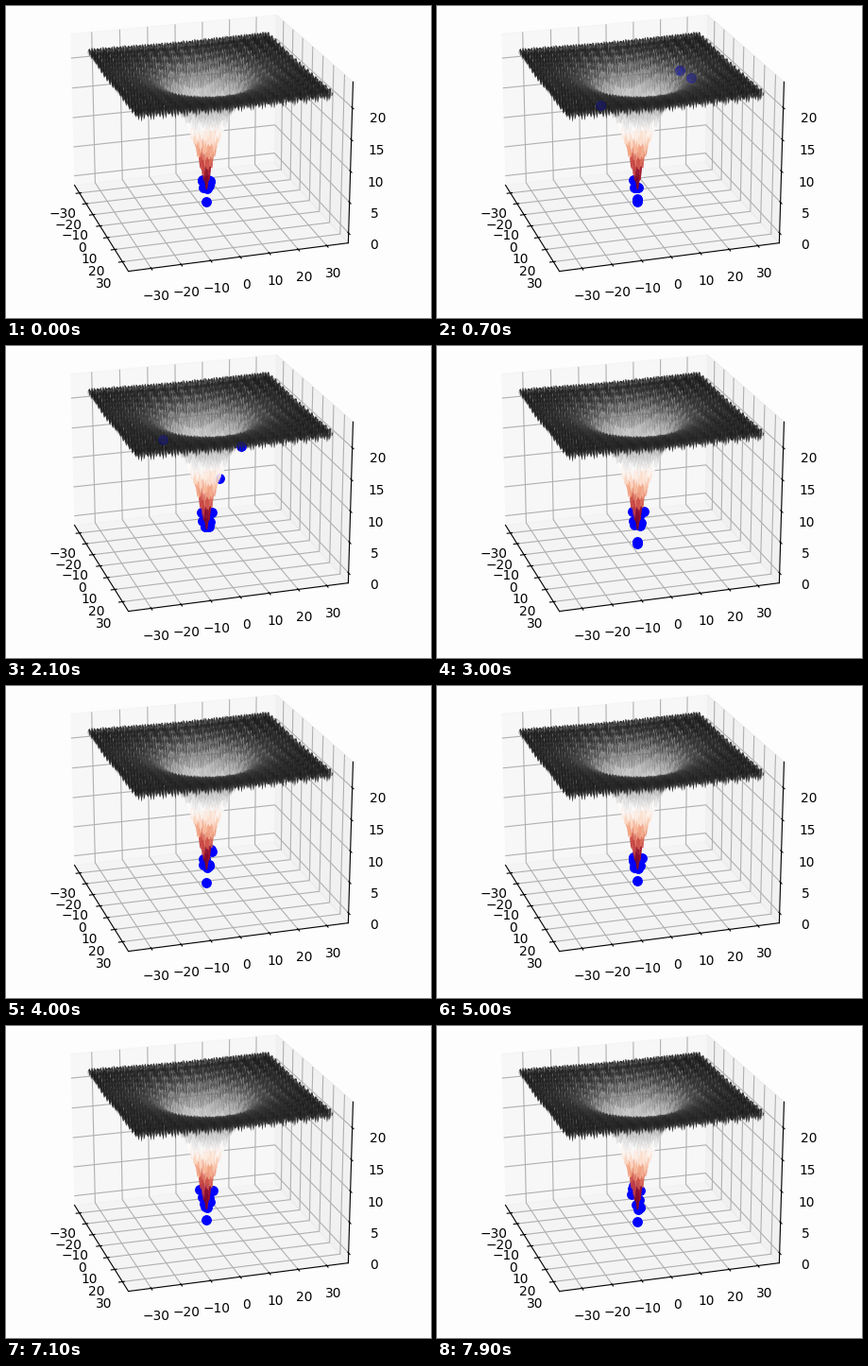
These frames come from a looping animation (450x330 px, 8000 ms). A matplotlib script:

```python
import numpy as np
import matplotlib.pyplot as plt
from matplotlib.animation import FuncAnimation
from matplotlib.collections import PolyCollection
from mpl_toolkits.mplot3d import proj3d

W, H, DPI = 450, 330, 100
FRAMES, STEP_MS = 80, 100
BACKGROUND = "#fefdfe"

EXTENT, TOP = 32.768, 22.35     # function domain and its highest value
PAD = 0.55 * 25 / 24            # half range including the axis margins
SIDE = 366                      # side of the square 3D axes in pixels
CENTER = np.array([212.2, 137.8])
VIEW_LOW, VIEW_SPAN = 0.095, 0.185

MEMBERS, SETTLED = 11, 32       # swarm size and the step when it has gathered
PAUSES = {22, 47, 62}


def ackley(x, y):
    bowl = 20 * (1 - np.exp(-0.2 * np.sqrt((x**2 + y**2) / 2)))
    waves = np.exp((np.cos(2 * np.pi * x) + np.cos(2 * np.pi * y)) / 2)
    return bowl + np.e - waves


plt.rcParams["font.family"] = "DejaVu Sans"
fig = plt.figure(figsize=(W / DPI, H / DPI), dpi=DPI, facecolor=BACKGROUND)

# Empty 3D box with its panes, grid and ticks
offset = SIDE * VIEW_LOW / VIEW_SPAN
left, bottom = CENTER[0] - offset, H - CENTER[1] - offset
box = fig.add_axes([left / W, bottom / H, SIDE / W, SIDE / H], projection="3d")
box.patch.set_visible(False)
box.view_init(elev=21, azim=-17)
reach = 2 * EXTENT * PAD
box.set_xlim(-reach, reach)
box.set_ylim(-reach, reach)
box.set_zlim(TOP * (0.5 - PAD), TOP * (0.5 + PAD))
box.set_xticks(range(-30, 31, 10))
box.set_yticks(range(-30, 31, 10))
box.set_zticks(range(0, 21, 5))
box.tick_params(labelsize=9.9)
VIEW = box.get_proj()

# Flat layer in pixel units for everything inside the box
stage = fig.add_axes([0, 0, 1, 1])
stage.set_xlim(0, W)
stage.set_ylim(H, 0)
stage.axis("off")


def project(x, y, z):
    """Pixel positions and depth of points in the box."""
    px, py, depth = proj3d.proj_transform(np.ravel(x), np.ravel(y), np.ravel(z), VIEW)
    scale = SIDE / VIEW_SPAN
    points = np.column_stack([CENTER[0] + scale * px, CENTER[1] - scale * py])
    return points, np.asarray(depth)


def add_surface(count=150, stride=3):
    axis = np.linspace(-EXTENT, EXTENT, count)
    x, y = np.meshgrid(axis, axis, indexing="ij")
    z = ackley(x, y)

    # outline of one patch, walked around its four sides
    k = np.arange(stride)
    zero = 0 * k
    di = np.concatenate([zero, k, zero + stride, stride - k])
    dj = np.concatenate([k, zero + stride, stride - k, zero])
    start = np.arange(0, count - 1, stride)
    si, sj = (s.reshape(-1, 1) for s in np.meshgrid(start, start, indexing="ij"))
    i = np.minimum(si + di, count - 1)
    j = np.minimum(sj + dj, count - 1)

    points, depth = project(x[i, j], y[i, j], z[i, j])
    order = np.argsort(-depth.reshape(i.shape).mean(axis=1))
    height = z[i, j].mean(axis=1)
    shade = (height - height.min()) / np.ptp(height)
    polygons = points.reshape(i.shape + (2,))[order]
    colors = plt.cm.RdGy(shade[order])
    stage.add_collection(PolyCollection(
        polygons, facecolors=colors, edgecolors="none", alpha=0.8, zorder=3))


def draw_member(rng, limit):
    """One spot near a local minimum, at times far out while the limit is wide."""
    if limit > 5 and rng.random() < 0.4:
        angle, radius = rng.uniform(0, 2 * np.pi), rng.uniform(5, limit)
        spot = radius * np.array([np.cos(angle), np.sin(angle)])
    else:
        spot = np.clip(rng.normal(0, 0.9, 2), -2, 2)
    return np.round(spot) + rng.normal(0, 0.06, 2)


def populations():
    """A gathered swarm scatters at the first step, then closes in again."""
    rng = np.random.default_rng(5)
    members = np.array([draw_member(rng, 0) for _ in range(MEMBERS)])
    result = [members]
    for step in range(1, FRAMES):
        if step not in PAUSES:
            limit = max(3, 27 * (1 - (step / SETTLED) ** 2))
            stay = (rng.random(MEMBERS) < 0.6) & (np.hypot(*members.T) < limit)
            fresh = np.array([draw_member(rng, limit) for _ in range(MEMBERS)])
            members = np.where(stay[:, None], members, fresh)
        result.append(members)
    return result


add_surface()
swarm = populations()
dot = dict(marker="o", ls="", color="#0000ff", ms=7, mew=0.8)
dots, = stage.plot([], [], zorder=2, **dot)
veiled, = stage.plot([], [], zorder=4, alpha=0.2, **dot)

ARROW = np.array([(0, 0), (0, 16), (3.8, 12.6), (6.3, 18.5), (8.8, 17.4),
                  (6.4, 11.6), (11.5, 11.5)])
pointer = plt.Polygon(ARROW, facecolor="white", edgecolor="#202020", lw=0.8, zorder=5)
stage.add_patch(pointer)


def draw(step):
    x, y = swarm[step].T
    points, _ = project(x, y, ackley(x, y))
    dots.set_data(*points.T)
    veiled.set_data(*points[np.hypot(x, y) > 6].T)

    pointer.set_visible(8 <= step < 18)
    pointer.set_xy(ARROW + ((386, 130) if step < 10 else (368, 122)))
    return dots, veiled, pointer


anim = FuncAnimation(fig, draw, frames=FRAMES, interval=STEP_MS, repeat=True,
                     repeat_delay=0)
plt.show()
```
